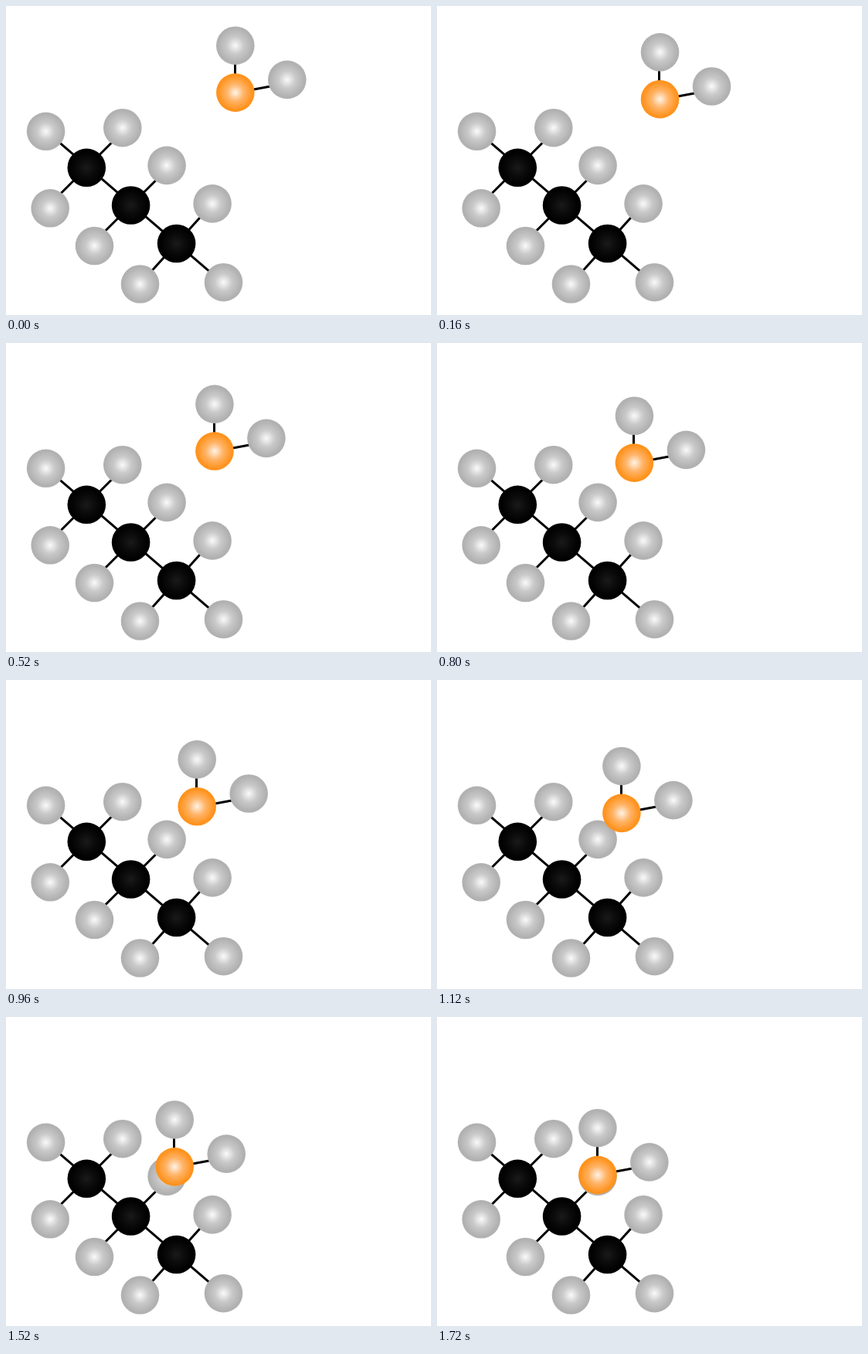
Animation, 550 px wide and 400 px high, one loop 2160 ms. Source, as an HTML page with a canvas:

```html
<!DOCTYPE html>
<html lang="en">
<head>
<meta charset="utf-8">
<title>Molecules</title>
<style>
  html, body { margin: 0; width: 100%; height: 100%; overflow: hidden; background: #fff; }
  canvas { display: block; }
</style>
</head>
<body>
<canvas id="stage" width="550" height="400"></canvas>
<script>
const ctx = document.getElementById('stage').getContext('2d');

const LOOP = 2160, STEP = 40, LAST_STEP = 43;
const RADIUS = 24.8;
const START = { x: 296.8, y: 112.1 }, END = { x: 207.9, y: 204.6 };

// Gradient colours from centre to rim
const HYDROGEN = ['#fafafa', '#c9c9c9', '#b1b1b1'];
const CARBON = ['#1a1a1a', '#0b0b0b', '#000000'];
const OXYGEN = ['#fff3e6', '#ffb468', '#ff931e'];

const carbons = [
  { x: 104.3, y: 209.3, slope: 1 },
  { x: 161.6, y: 258, slope: 1 },
  { x: 220.6, y: 307.5, slope: 1.11 }
];
const [first, , last] = carbons;

// Every carbon has a hydrogen above right and below left; the ends have one more
const hydrogens = [
  ...carbons.flatMap(({ x, y }) => [
    { x: x + 46.5, y: y - 51.6 },
    { x: x - 47.1, y: y + 52.5 }
  ]),
  { x: first.x - 52.7, y: first.y - 47 },
  { x: last.x + 60.9, y: last.y + 50.2 }
];

const mix = (a, b, p) => a + (b - a) * p;
const snap = v => Math.floor(v - 0.7) + 0.5;

function bond(x, y, dx, dy) {
  ctx.beginPath();
  ctx.moveTo(x, y);
  ctx.lineTo(x + dx, y + dy);
  ctx.stroke();
}

function atom(x, y, colors) {
  const fill = ctx.createRadialGradient(x, y, 0, x, y, RADIUS * 0.9);
  colors.forEach((color, i) => fill.addColorStop(i / 2, color));
  ctx.fillStyle = fill;
  ctx.beginPath();
  ctx.arc(x, y, RADIUS, 0, Math.PI * 2);
  ctx.fill();
}

function drawChain() {
  bond(first.x - 44, first.y - 40.2, 212, 182.2);
  for (const { x, y, slope } of carbons) {
    bond(x - 42, y + 42 * slope, 84, -84 * slope);
  }
  hydrogens.forEach(({ x, y }) => atom(x, y, HYDROGEN));
  carbons.forEach(({ x, y }) => atom(x, y, CARBON));
}

function drawRadical(x, y) {
  // Strokes sit on whole pixels, atoms move freely
  const bx = snap(x), by = snap(y) + 1;
  bond(bx, by, 0, -61);
  bond(bx, by, 67, -12.5);
  atom(x, y - 60.9, HYDROGEN);
  atom(x + 67, y - 16.7, HYDROGEN);
  atom(x, y, OXYGEN);
}

function draw(ms) {
  const step = Math.min(LAST_STEP, Math.floor((ms % LOOP) / STEP));
  const p = step / LAST_STEP;
  ctx.fillStyle = '#fff';
  ctx.fillRect(0, 0, 550, 400);
  ctx.lineWidth = 3;
  drawChain();
  drawRadical(mix(START.x, END.x, p), mix(START.y, END.y, p));
}

const began = performance.now();
function tick() {
  draw(performance.now() - began);
  requestAnimationFrame(tick);
}
tick();
</script>
</body>
</html>
```
